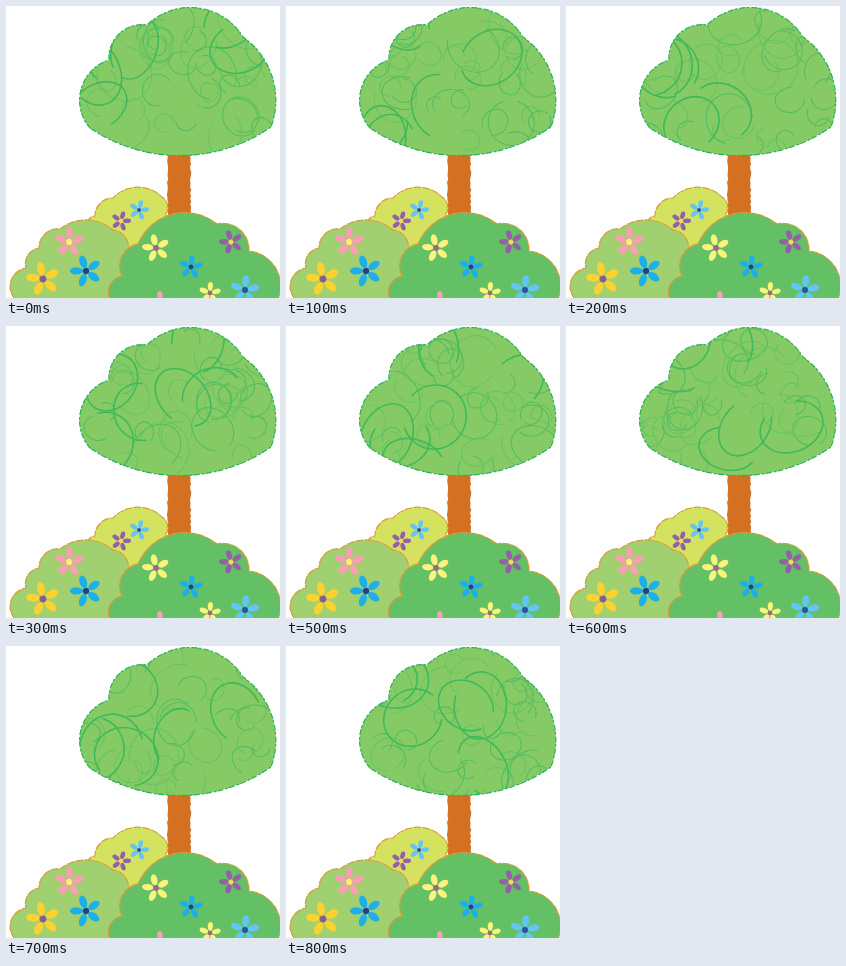
Write an HTML page with a canvas that moves like this. It is 274 px wide and 292 px high and loops after 0.9 s.

```html
<!DOCTYPE html>
<html lang="en">
<head>
<meta charset="utf-8">
<title>Scribbled tree</title>
<style>
html, body { margin: 0; width: 100%; height: 100%; overflow: hidden; background: #fff; }
canvas { display: block; width: 274px; height: 292px; }
</style>
</head>
<body>
<canvas></canvas>
<script>
const STEP_MS = 100, STEPS = 9;
const canvas = document.querySelector('canvas');
const ctx = canvas.getContext('2d');
const ratio = window.devicePixelRatio || 1;
canvas.width = 274 * ratio;
canvas.height = 292 * ratio;
ctx.scale(ratio, ratio);
ctx.lineCap = 'round';

// Chain of outward arcs through notches "x,y[,bulge]"; bulge is arc height / chord.
function lumps(text, usualBulge) {
  let [[x, y], ...notches] = text.split(' ').map(p => p.split(',').map(Number));
  let d = `M${x},${y}`;
  for (const [nx, ny, bulge = usualBulge] of notches) {
    const r = Math.hypot(nx - x, ny - y) * (1 / (8 * bulge) + bulge / 2);
    d += `A${r},${r} 0 0 1 ${nx},${ny}`;
    [x, y] = [nx, ny];
  }
  return new Path2D(d + 'Z');
}

const crown = lumps('84,122 103,54,.27 141,19 237,31 265,121,.17 84,122,.155', .24);
const bushes = [
  ['#d5e25f', lumps('82,217 89,210 107,192 156,191 160,208 122,250', .21)],
  ['#a0d070', lumps('9,293 20,262,.3 33,242 54,223 107,224,.18 122,246 130,293', .23)],
  ['#64c065', lumps('104,293 116,270 132,238 211,218 243,245 272,293', .25)],
];

// Petal colour, heart colour, then x,y,radius of each flower
const flowers = [
  ['#9361a5', '#fdd45a', '115,215,10 225,236,12'],
  ['#fa9db5', '#fff06b', '63,236,15 154,297,12'],
  ['#fdd22f', '#8a5a8c', '37,273,17'],
  ['#fff37d', '#a2668c', '150,242,14 204,287,11'],
  ['#1cb0ea', '#23418f', '80,265,16 185,261,12'],
  ['#62c4f7', '#28559b', '133,204,10 239,284,15'],
];

function randomizer(seed) {
  return (low, high) => {
    seed = seed * 16807 % 2147483647;
    return low + (high - low) * seed / 2147483647;
  };
}

function drawTrunk() {
  const random = randomizer(51);
  ctx.beginPath();
  for (let y = 146; y <= 212; y += 2) ctx.lineTo(random(161, 162.5), y);
  for (let y = 212; y >= 146; y -= 2) ctx.lineTo(random(184, 185.5), y);
  ctx.fillStyle = '#d37022';
  ctx.fill();
}

function drawScribble(step) {
  const random = randomizer(9173 * (step + 3));
  const loops = 42;
  ctx.save();
  ctx.clip(crown);
  for (let i = 0; i < loops; i++) {
    const size = i / loops;
    const start = random(0, 6);
    ctx.beginPath();
    ctx.ellipse(random(80, 262), random(12, 144), 10 + 26 * size * size, 9 + random(14, 26) * size * size,
      random(0, 3), start, start + random(2.5, 6));
    ctx.strokeStyle = size > .85 ? '#3fba5a' : i % 2 ? '#6ac461' : '#55be5e';
    ctx.lineWidth = size > .85 ? 1.6 : 1.1;
    ctx.stroke();
  }
  ctx.restore();
}

function drawShape(shape, fill, outline, dash) {
  ctx.fillStyle = fill;
  ctx.fill(shape);
  ctx.setLineDash(dash);
  ctx.strokeStyle = outline;
  ctx.lineWidth = 1.2;
  ctx.stroke(shape);
}

function drawFlower(x, y, r, petal, heart) {
  ctx.save();
  ctx.translate(x, y);
  ctx.rotate(-Math.PI / 2 + .3 * Math.sin(x));
  ctx.fillStyle = petal;
  for (let i = 0; i < 5; i++) {
    ctx.beginPath();
    ctx.ellipse(r * .6, 0, r * .4, r * .23, 0, 0, 7);
    ctx.fill();
    ctx.rotate(2 * Math.PI / 5);
  }
  ctx.fillStyle = heart;
  ctx.beginPath();
  ctx.arc(0, 0, r * .2, 0, 7);
  ctx.fill();
  ctx.restore();
}

function draw(step) {
  ctx.fillStyle = '#fff';
  ctx.fillRect(0, 0, 274, 292);
  drawTrunk();
  drawShape(crown, '#86ca65', '#25b15a', [5, 2, 2, 3]);
  ctx.setLineDash([]);
  drawScribble(step);
  for (const [color, shape] of bushes) drawShape(shape, color, '#d99a3c', [7, 2]);
  for (const [petal, heart, spots] of flowers)
    for (const spot of spots.split(' ')) drawFlower(...spot.split(',').map(Number), petal, heart);
}

const began = performance.now();
let shown = -1;
function tick() {
  const step = Math.floor((performance.now() - began) / STEP_MS) % STEPS;
  if (step !== shown) draw(shown = step);
  requestAnimationFrame(tick);
}
tick();
</script>
</body>
</html>
```
